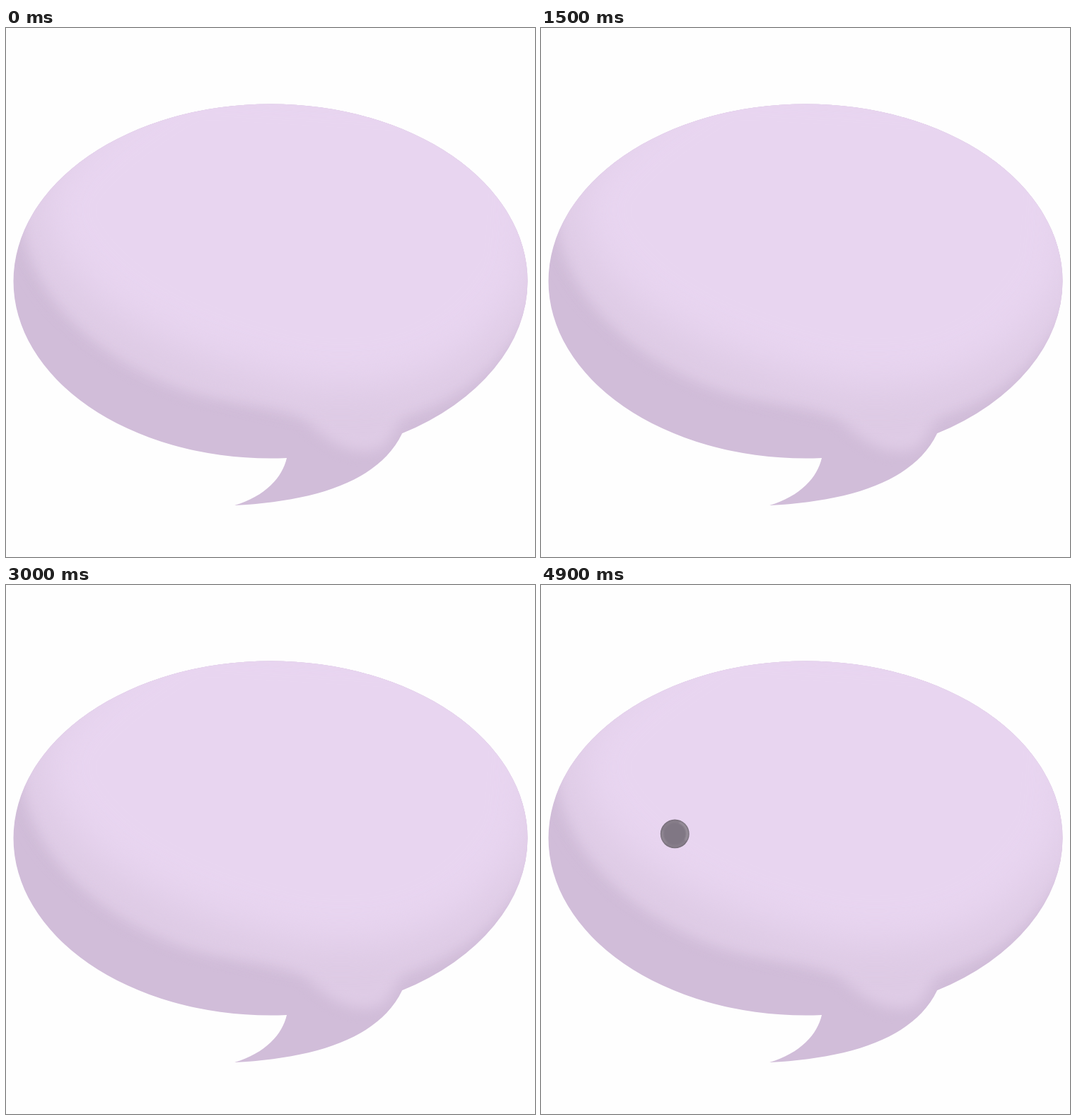
Recreate the animation shown at these times as an HTML page. Size 748 by 748 pixels, loop 5.01 s.

```html
<!DOCTYPE html>
<html lang="en">
<head>
<meta charset="utf-8">
<title>Typing bubble</title>
<style>
  html, body { margin: 0; width: 100%; height: 100%; overflow: hidden; background: #fefefe; }
  svg { display: block; width: 100vw; height: 100vh; }
  .face { fill: #deCBe5; filter: blur(9px); }
  .light { fill: #e8d5f0; filter: blur(28px); }
  .shine { fill: none; stroke: #aaa1ac; stroke-width: 6; filter: blur(2.5px); }
</style>
</head>
<body>
<svg viewBox="0 0 748 748">
  <defs>
    <clipPath id="bubble">
      <ellipse cx="374" cy="358" rx="363.5" ry="250.5"/>
      <path d="M397 600V608C391 635 367 662 323 675C435 669 527 642 560 573.5L540 540Z"/>
    </clipPath>
    <radialGradient id="grey">
      <stop offset=".68" stop-color="#807784"/>
      <stop offset=".86" stop-color="#877e8a"/>
      <stop offset=".95" stop-color="#7d7480"/>
      <stop offset="1" stop-color="#6d656f"/>
    </radialGradient>
    <g id="dot">
      <circle r="49" fill="url(#grey)"/>
      <path class="shine" opacity=".6" d="M16 -39A42 42 0 0 1 36 22"/>
      <path class="shine" opacity=".3" d="M-41 -10A42 42 0 0 0 -28 32"/>
    </g>
  </defs>
  <g clip-path="url(#bubble)">
    <rect width="748" height="748" fill="#d1bdd9"/>
    <path class="face" d="M22 270C32 380 130 470 250 513C310 533 385 533 425 556C452 580 475 599 508 599C552 599 540 563 570 549C640 526 705 480 750 385V60H160C60 120 18 190 22 270Z"/>
    <path class="light" d="M52 260C80 400 270 475 430 505C600 520 690 450 742 350L760 90L250 60C130 130 50 200 52 260Z"/>
  </g>
  <g id="dots"></g>
</svg>
<script>
  const LOOP = 5010, CYCLE = 1500, STEP = 100;
  const dots = [
    { x: 190, y: 351.1, start: 0, length: 900 },
    { x: 386.2, y: 350.4, start: 600, length: 500 },
    { x: 576.3, y: 349.5, start: 1000, length: 400 }
  ];
  const layer = document.getElementById('dots');
  for (const dot of dots) {
    dot.el = document.createElementNS('http://www.w3.org/2000/svg', 'use');
    dot.el.setAttribute('href', '#dot');
    layer.append(dot.el);
  }

  const smooth = u => u * u * (3 - 2 * u);
  const clamp = u => Math.max(0, Math.min(1, u));

  function draw(now) {
    // The picture advances in steps; the last one lasts 10 ms longer.
    const step = Math.min(49, Math.floor(now % LOOP / STEP));
    const time = step * STEP % CYCLE;
    for (const { el, x, y, start, length } of dots) {
      const s = smooth(clamp((time - start) / length));
      el.style.display = s ? '' : 'none';
      el.setAttribute('transform', `translate(${x - 1.8 * s} ${y + 2 * s}) scale(${s})`);
    }
    requestAnimationFrame(draw);
  }
  draw(performance.now());
</script>
</body>
</html>
```
